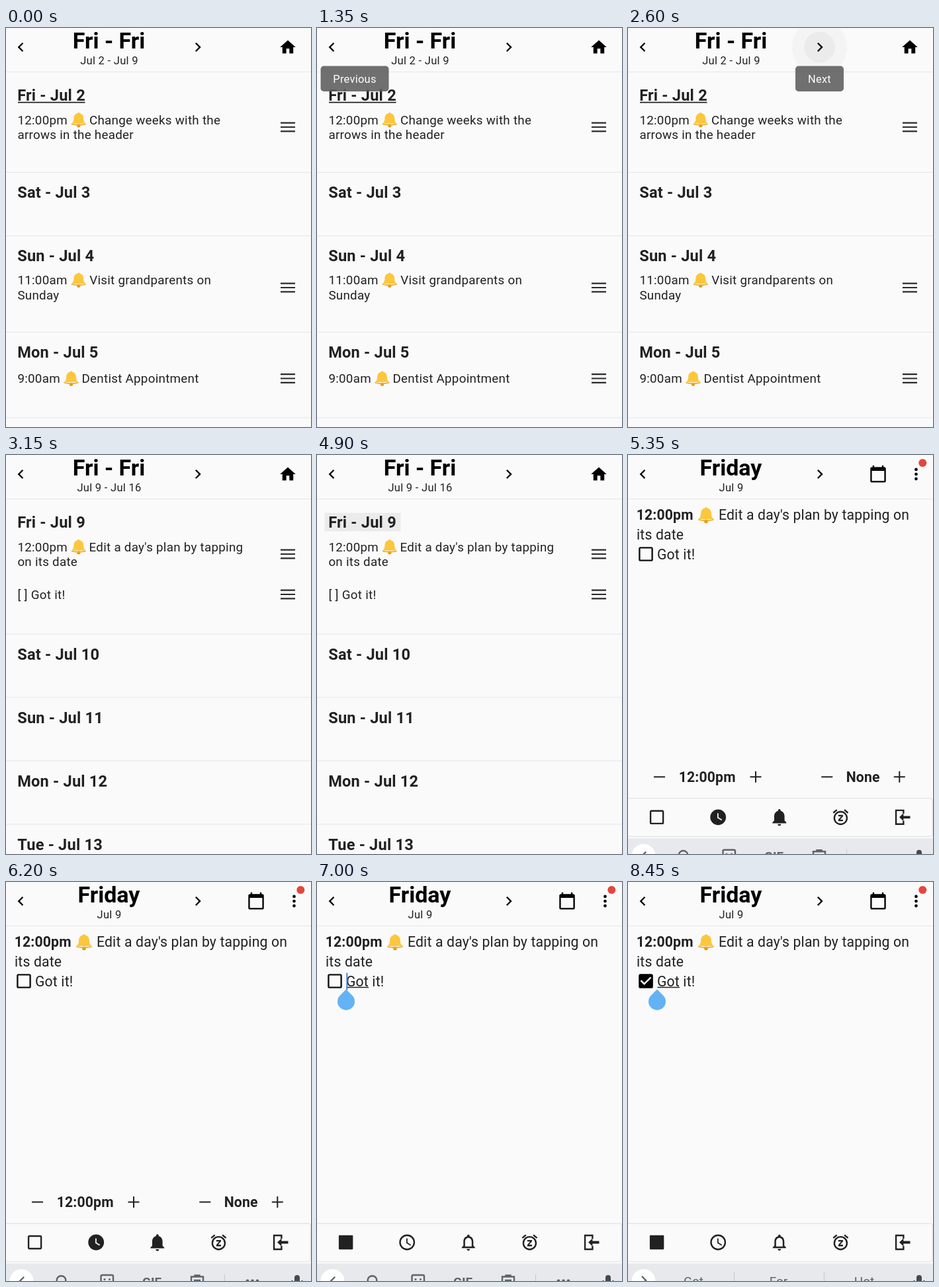
Animation, 461 px wide and 604 px high, one loop 8500 ms. Source, as an HTML page:

```html
<!DOCTYPE html>
<html lang="en">
<head>
<meta charset="utf-8">
<title>Weekly planner</title>
<style>
  html, body { margin: 0; width: 100%; height: 100%; overflow: hidden; background: #fafafa; }
  svg { position: fixed; left: 0; top: 0; display: block; }
  text { font-family: Roboto, "Noto Sans", sans-serif; fill: #212121; white-space: pre; }
  .title { font-size: 34px; font-weight: 700; fill: #000; text-anchor: middle; }
  .sub { font-size: 16.5px; letter-spacing: .29px; text-anchor: middle; }
  .date { font-size: 23.6px; font-weight: 700; letter-spacing: .2px; }
  .item { font-size: 18.8px; letter-spacing: .27px; }
  .note { font-size: 21.2px; letter-spacing: .16px; }
  .bold { font-weight: 700; }
  .tip { font-size: 16.4px; letter-spacing: .29px; fill: #fff; text-anchor: middle; }
  .key { font-size: 19px; fill: #5f6368; text-anchor: middle; }
  .line { stroke: #e6e6e6; stroke-width: 1.2; }
</style>
</head>
<body>
<svg id="stage" width="461" height="604" viewBox="0 0 461 604"></svg>
<script>
const LOOP = 8500, STEP = 50, SCALE = 1.174;

const ICON = {
  left: 'M15.41 7.41L14 6l-6 6 6 6 1.41-1.41L10.83 12z',
  right: 'M10 6L8.59 7.41 13.17 12l-4.58 4.59L10 18l6-6z',
  home: 'M10 20v-6h4v6h5v-8h3L12 3 2 12h3v8z',
  calendar: 'M20 3h-1V1h-2v2H7V1H5v2H4c-1.1 0-2 .9-2 2v16c0 1.1.9 2 2 2h16c1.1 0 2-.9 2-2V5c0-1.1-.9-2-2-2zm0 18H4V8h16v13z',
  more: 'M12 8a2 2 0 1 0 0-4 2 2 0 0 0 0 4zm0 2a2 2 0 1 0 0 4 2 2 0 0 0 0-4zm0 6a2 2 0 1 0 0 4 2 2 0 0 0 0-4z',
  box: 'M19 5v14H5V5h14m0-2H5c-1.1 0-2 .9-2 2v14c0 1.1.9 2 2 2h14c1.1 0 2-.9 2-2V5c0-1.1-.9-2-2-2z',
  square: 'M4 3h16q1 0 1 1v16q0 1-1 1H4q-1 0-1-1V4q0-1 1-1z',
  checked: 'M19 3H5c-1.11 0-2 .9-2 2v14c0 1.1.89 2 2 2h14c1.11 0 2-.9 2-2V5c0-1.1-.89-2-2-2zm-9 14l-5-5 1.41-1.41L10 14.17l7.59-7.59L19 8l-9 9z',
  clockFull: 'M12 2a10 10 0 1 0 0 20 10 10 0 0 0 0-20zm4.2 14.2L11 13V7h1.5v5.2l4.5 2.7z',
  clock: 'M12 2a10 10 0 1 0 0 20 10 10 0 0 0 0-20zm0 2a8 8 0 1 1 0 16 8 8 0 0 1 0-16zM11 7v6l5.2 3.2.8-1.3-4.5-2.7V7z',
  bellFull: 'M12 22c1.1 0 2-.9 2-2h-4c0 1.1.89 2 2 2zm6-6v-5c0-3.07-1.64-5.64-4.5-6.32V4c0-.83-.67-1.5-1.5-1.5s-1.5.67-1.5 1.5v.68C7.63 5.36 6 7.92 6 11v5l-2 2v1h16v-1l-2-2z',
  snooze: 'M7.88 3.39L6.6 1.86 2 5.71l1.29 1.53zM22 5.72l-4.6-3.86-1.29 1.53 4.6 3.86zM12 4a9 9 0 1 0 0 18 9 9 0 0 0 0-18zm0 2a7 7 0 1 1 0 14 7 7 0 0 1 0-14zM9 11h3.63L9 15.2V17h6v-2h-3.63L15 10.8V9H9z',
  exit: 'M3.5 2.2H15v5.3h-2V4.2H5.500v15.600H13V16.500h2v5.300H3.500zM22.500 10.400v3.200H14v3.400L8.700 12 14 7v3.400z'
};
ICON.bell = ICON.bellFull + 'm-2 1H8v-6c0-2.48 1.51-4.5 4-4.5s4 2.02 4 4.5v6z';

const icon = (name, x, y, color = '#212121', scale = SCALE) =>
  `<path d="${ICON[name]}" fill="${color}" fill-rule="evenodd"
    transform="translate(${x} ${y}) scale(${scale}) translate(-12 -12)"/>`;
const text = (cls, x, y, s) => `<text class="${cls}" x="${x}" y="${y}">${s}</text>`;
const rule = y => `<path class="line" d="M0 ${y}H461"/>`;
const group = (id, body) => `<g id="${id}">${body}</g>`;
const date = (y, s) => text('date', 17.2, y, s);
const item = (x, y, s) => text('item', x, y, s);
const grip = y => `<path d="M415 ${y - 6.3}h22m-22 6.300h22m-22 6.300h22" stroke="#2a2a2a" stroke-width="2.2"/>`;
const alarm = (x, y, s) => `<g transform="translate(${x} ${y}) scale(${s}) translate(-12 -12)">
  <circle cx="12" cy="20.3" r="2.5" fill="#df9c1a"/><circle cx="12" cy="3.4" r="1.8" fill="#f2b83a"/>
  <path d="M12 2.6c-4.400 0-6.700 2.800-6.900 6.700-.2 4.200-.8 5.800-3.300 8h20.400c-2.500-2.200-3.100-3.800-3.300-8-.2-3.900-2.500-6.700-6.900-6.700z" fill="#fcc73c"/>
  <path d="M1.700 17.200q10.300 2.400 20.600 0v1.700q-10.300 2.600-20.600 0z" fill="#efae2b"/></g>`;
const tooltip = (id, x, w, s) => group(id,
  `<rect x="${x}" y="57.5" width="${w}" height="38.5" rx="4.7" fill="#616161" opacity=".9"/>`
  + text('tip', x + w / 2, 83, s));
const header = (title, sub) => '<path d="M0 0H461V66H0z" fill="#fafafa"/>' + rule(66.5)
  + text('title', 155.5, 31, title) + text('sub', 156, 54.5, sub);
const plus = (x, y) => `<path d="M${x - 8.5} ${y}h17m-8.5-8.5v17" stroke="#212121" stroke-width="2"/>`;
const minus = (x, y) => `<path d="M${x - 8.5} ${y}h17" stroke="#212121" stroke-width="2"/>`;
const caret = (id, x, y) =>
  `<rect id="${id}" x="${x}" y="${y}" width="2" height="26" fill="#4f83dc"/>`;

const weekOne = [218.5, 314.5, 460.5, 590].map(rule).join('')
  + date(110, 'Fri - Jul 2') + '<path d="M18 112.700H119.500" stroke="#212121" stroke-width="1.7"/>'
  + item(17.4, 145.5, '12:00pm') + alarm(109.8, 139, 1.06) + item(126, 145.5, 'Change weeks with the')
  + item(17.4, 168, 'arrows in the header')
  + date(257, 'Sat - Jul 3') + date(353, 'Sun - Jul 4')
  + item(17.4, 388, '11:00am') + alarm(109.8, 381.5, 1.06) + item(126.2, 388, 'Visit grandparents on')
  + item(17.4, 410.5, 'Sunday')
  + date(499, 'Mon - Jul 5')
  + item(17.4, 537, '9:00am') + alarm(98.5, 530.5, 1.06) + item(114.5, 537, 'Dentist Appointment')
  + [150, 393, 530.5].map(grip).join('');

const weekTwo = [271, 367, 463, 559].map(rule).join('')
  + '<rect id="press" x="11.5" y="87.5" width="115" height="28" fill="#ebebeb"/>'
  + date(110, 'Fri - Jul 9')
  + item(17.4, 145.5, '12:00pm') + alarm(109.8, 139, 1.06) + item(125.6, 145.5, "Edit a day's plan by tapping")
  + item(17.4, 168, 'on its date') + item(17.4, 217.5, '[ ] Got it!')
  + ['Sat - Jul 10', 'Sun - Jul 11', 'Mon - Jul 12', 'Tue - Jul 13']
    .map((s, i) => date(309.5 + 96 * i, s)).join('')
  + [150, 211].map(grip).join('');

const day = '<path d="M0 0H461V604H0z" fill="#fafafa"/>' + header('Friday', 'Jul 9')
  + icon('calendar', 378, 28.7, '#000') + icon('more', 435.5, 29, '#000')
  + '<circle cx="445.3" cy="12" r="6" fill="#e5453b"/>'
  + text('note bold', 12.7, 97.5, '12:00pm') + alarm(118, 91, 1.14)
  + text('note', 137, 97.5, "Edit a day's plan by tapping on")
  + text('note', 13, 127.5, 'its date') + text('note', 44, 157.5, 'Got it!')
  + group('open', icon('box', 27, 150, '#111', 1.2)) + group('done', icon('checked', 27, 150, '#000', 1.2))
  + caret('caretA', 13, 77)
  + group('pick', '<path d="M44.500 159.500H78" stroke="#212121" stroke-width="1.5"/>'
    + '<path d="M44 162.500l9.200 9.200a13 13 0 1 1-18.400 0z" fill="#64b2f6"/>')
  + caret('caretB', 44.3, 137.5);

// The bells sit larger in their cells than the other tools
const TOOL_SCALE = { bellFull: 1.3, bell: 1.25 };
const cell = i => 43.6 + 92.6 * i;
const tools = names => names.map((n, i) =>
  icon(n, cell(i), 545.5, '#212121', TOOL_SCALE[n] || 1.19)).join('');
const panel =
  group('times', minus(47.5, 484.5) + text('note bold', 76.7, 492, '12:00pm') + plus(193, 484.5)
    + minus(300.8, 484.5) + text('note bold', 329.7, 492, 'None') + plus(410.3, 484.5))
  + '<rect x="-6" y="516.8" width="466.5" height="57.7" rx="4" fill="#fafafa" stroke="#e2e2e2" stroke-width="1.2"/>'
  + group('toolsA', tools(['box', 'clockFull', 'bellFull', 'snooze', 'exit']))
  + group('toolsB', tools(['square', 'clock', 'bell', 'snooze', 'exit']))
  + '<path d="M0 577.5H461V940H0z" fill="#e7e9ec"/><circle cx="23.5" cy="604" r="18" fill="#fff"/>'
  + group('keysA', icon('left', 24, 604, '#5f6368')
    + `<g fill="none" stroke="#5f6368" stroke-width="2.4"><circle cx="83.5" cy="603" r="6.8"/><path d="M88 608l6 6"/>
      <rect x="143.5" y="595" width="18.5" height="18.5" rx="2"/>
      <path d="M280 597.5h18v17h-18zM285.500 597.500v-2h7v2M284 603h10"/></g>
      <g fill="#5f6368"><circle cx="149" cy="601.5" r="1.5"/><circle cx="156.5" cy="601.5" r="1.5"/>
      <circle cx="365" cy="604" r="2.4"/><circle cx="372.5" cy="604" r="2.4"/><circle cx="380" cy="604" r="2.4"/></g>
      <path d="M330.5 594V612" stroke="#c4c8cc"/>`
    + '<text class="key bold" x="220.5" y="611.5">GIF</text>')
  + group('keysB', icon('right', 24, 603, '#5f6368')
    + text('key', 99, 611, 'Got') + text('key', 227.5, 611, 'For') + text('key', 357, 611, 'Hot')
    + '<path d="M160.500 590V612M296.500 590V612" stroke="#c4c8cc"/>')
  + '<rect x="436" y="595" width="8" height="15" rx="4" fill="#454a4f"/>'
  + '<path d="M432.500 603a7.500 7.500 0 0 0 15 0" fill="none" stroke="#454a4f" stroke-width="2"/>';

document.getElementById('stage').innerHTML =
  '<clipPath id="bar"><path d="M0 0H461V66H0z"/></clipPath>'
  + group('listA', weekOne) + group('listB', weekTwo)
  + group('headA', header('Fri - Fri', 'Jul 2 - Jul 9'))
  + group('headB', header('Fri - Fri', 'Jul 9 - Jul 16'))
  + group('home', icon('home', 426, 29, '#000'))
  + group('day', day) + group('panel', panel)
  + '<g clip-path="url(#bar)"><circle id="tapA" cx="20" cy="31"/>'
  + '<circle id="haloB" cx="289.5" cy="29" r="41.7"/><circle id="tapB" cx="289.5" cy="29"/></g>'
  + icon('left', 22.3, 29, '#000') + icon('right', 290, 29, '#000')
  + tooltip('tipA', 5.5, 103, 'Previous') + tooltip('tipB', 253, 73, 'Next');

const $ = {};
document.querySelectorAll('[id]').forEach(e => { $[e.id] = e; });

const ramp = (t, a, b) => Math.min(1, Math.max(0, (t - a) / (b - a)));
const show = (name, v) => {
  $[name].style.opacity = Number(v);
  $[name].style.display = v ? '' : 'none';
};
const within = (t, ...spans) => spans.some(([a, b]) => t >= a && t < b);

function draw(t) {
  // Week swap
  const swap = ramp(t, 3050, 3150);
  for (const part of ['list', 'head']) {
    show(part + 'A', 1 - swap);
    show(part + 'B', swap);
  }
  show('press', ramp(t, 4750, 4900));

  // Tooltips and touch ripples
  show('tipA', ramp(t, 1200, 1350) * (1 - ramp(t, 2050, 2200)));
  show('tipB', t < 2950 ? ramp(t, 2450, 2600) : 0);
  $.tapA.setAttribute('r', 8.5 * ramp(t, 850, 1050));
  show('tapA', .03 * ramp(t, 850, 950) * (1 - ramp(t, 1100, 1300)));
  const lift = 1 - ramp(t, 2950, 3150);
  $.tapB.setAttribute('r', 23.5 * ramp(t, 2150, 2600));
  show('tapB', .035 * ramp(t, 2100, 2250) * lift);
  show('haloB', .025 * ramp(t, 2150, 2450) * lift);

  // Day page fades in while the list drifts down, then the keyboard rises
  show('day', ramp(t, 5000, 5300));
  $.listB.setAttribute('transform', `translate(0 ${51 * ramp(t, 5000, 5200)})`);
  show('panel', t >= 5200);
  $.panel.setAttribute('transform', `translate(0 ${180 * (1 - ramp(t, 5200, 5400)) ** 3})`);

  // Editing
  const picked = t >= 6900;
  show('caretA', within(t, [5800, 6200], [6600, 6900]));
  show('caretB', within(t, [6900, 7650], [8050, 8450]));
  show('pick', picked);
  show('times', 1 - ramp(t, 6800, 6950));
  show('toolsA', !picked);
  show('toolsB', picked);
  show('open', t < 7150);
  show('done', t >= 7150);
  const suggest = ramp(t, 7100, 7250);
  show('keysA', 1 - suggest);
  show('keysB', suggest);
}

const start = performance.now();
function tick() {
  const t = (performance.now() - start) % LOOP;
  draw(Math.floor(t / STEP) * STEP);
  requestAnimationFrame(tick);
}
tick();
</script>
</body>
</html>
```
